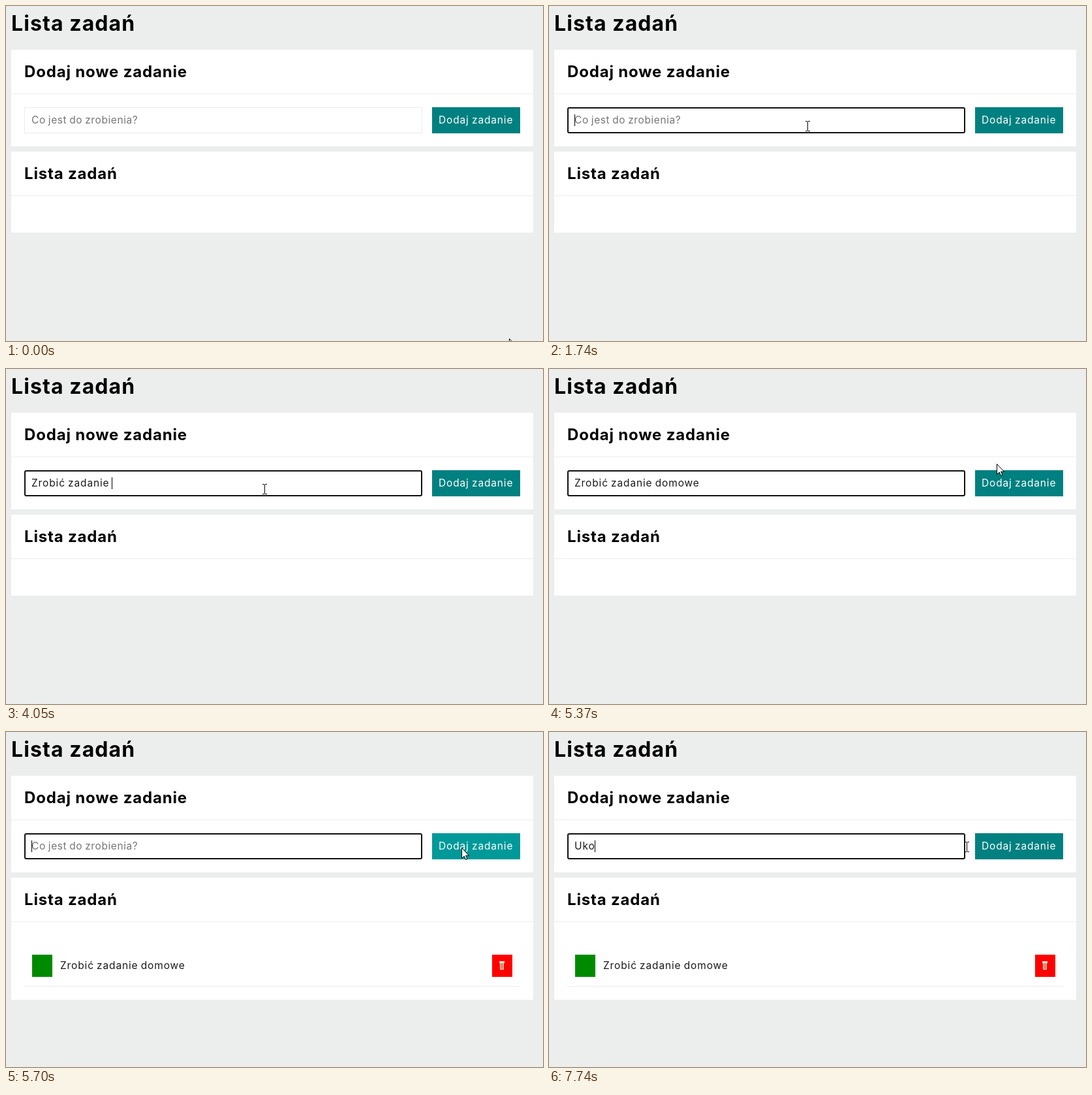
An HTML page that plays this animation: 823 px wide and 513 px high, repeating every 8000 ms.

```html
<!DOCTYPE html>
<html lang="pl">
<head>
<meta charset="utf-8">
<title>Lista zadań</title>
<style>
  html, body { margin: 0; width: 100%; height: 100%; overflow: hidden; background: #eceeee; }
  svg { display: block; width: 100vw; height: 100vh; }
  text {
    font: 400 15.5px Inter, sans-serif;
    letter-spacing: .055em; word-spacing: -.06em;
    white-space: pre; fill: #1a1a1a;
  }
  .h1, .h2 { font-weight: 700; letter-spacing: .034em; word-spacing: 0; fill: #000; }
  .h1 { font-size: 32px; }
  .h2 { font-size: 24px; }
  .hint { letter-spacing: .038em; fill: #757575; }
  .light { fill: #fff; }
  .line { fill: #eceeee; }
</style>
</head>
<body>
<svg viewBox="0 0 823 513" xmlns="http://www.w3.org/2000/svg">
  <rect width="823" height="513" fill="#eceeee"/>
  <text class="h1" x="8" y="38">Lista zadań</text>

  <rect x="8" y="67" width="800" height="148" fill="#fff"/>
  <rect x="8" y="134" width="800" height="1" class="line"/>
  <text class="h2" x="28" y="109">Dodaj nowe zadanie</text>
  <rect id="field" fill="#fff"/>
  <text id="hint" class="hint" x="39" y="180">Co jest do zrobienia?</text>
  <text id="typed" x="39" y="180"></text>
  <rect id="caret" y="166" width="1" height="18"/>
  <rect id="button" x="653" y="155" width="135" height="40"/>
  <text class="light" x="663" y="180">Dodaj zadanie</text>

  <rect id="card" x="8" y="223" width="800" fill="#fff"/>
  <rect x="8" y="290" width="800" height="1" class="line"/>
  <text class="h2" x="28" y="265">Lista zadań</text>
  <g id="task">
    <rect x="40" y="341" width="31" height="34" fill="#008a00"/>
    <text x="83" y="363">Zrobić zadanie domowe</text>
    <rect x="745" y="341" width="31" height="34" fill="#f00"/>
    <path d="M757.5 354V363.5H762.5V354M760 354V363" fill="#c8643c" stroke="#f6e3d3"/>
    <path d="M756 351h8v3h-8z" fill="#f6e3d3"/>
    <rect x="28" y="389" width="760" height="1" class="line"/>
  </g>

  <g id="pointer">
    <circle id="press" cx="-2" cy="-1" r="12" fill="#ff0" fill-opacity=".5"/>
    <path id="arrow" d="M.5 .5V16.5L4.2 13L6.7 18.5L9 17.5L6.6 12.2H11.5Z" fill="#fff" stroke="#000"/>
    <path id="beam" d="M-3 -7.5H0M1 -7.5H4M.5 -7V7M-3 7.5H0M1 7.5H4" fill="none" stroke="#000"/>
  </g>
</svg>
<script>
const LOOP = 8000, FRAME = 66.2, BLINK = 527, FOCUS = 664, ADDED = 5627;
const $ = id => document.getElementById(id);
const show = (id, on) => $(id).setAttribute('visibility', on ? 'visible' : 'hidden');
const set = (id, attrs) => {
  for (const k in attrs) $(id).setAttribute(k, attrs[k]);
};

// Bursts of evenly spaced key presses.
const bursts = [
  { text: 'Z', from: 1810, to: 1810 },
  { text: 'robi', from: 2210, to: 2660 },
  { text: 'ć za', from: 2920, to: 3510 },
  { text: 'danie ', from: 3580, to: 4050 },
  { text: 'domowe', from: 4180, to: 4640 },
  { text: 'Uko', from: 6880, to: 7735 }
];
const keys = bursts.flatMap(({ text, from, to }) =>
  [...text].map((char, i) => ({ char, time: from + (to - from) * i / Math.max(1, text.length - 1) })));

const smooth = u => u * u * (3 - 2 * u);
const easeOut = u => 1 - (1 - u) ** 3;
const entry = [771, 509], rest = [396, 184], target = [698, 177], edge = [640, 176];
const legs = [
  { from: 0, to: 600, a: entry, b: rest, ease: smooth, lift: 0 },
  { from: 5100, to: 5500, a: rest, b: target, ease: easeOut, lift: 36 },
  { from: 5700, to: 5990, a: target, b: edge, ease: smooth, lift: 0 }
];

function pointerAt(t) {
  const held = Math.floor(t / FRAME) * FRAME;
  const leg = legs.filter(l => l.from <= held).pop();
  const u = Math.min(1, (held - leg.from) / (leg.to - leg.from));
  const [x, y] = leg.a.map((v, i) => v + (leg.b[i] - v) * leg.ease(u));
  return [Math.round(x), Math.round(y - leg.lift * Math.sin(Math.PI * u))];
}

function drawField(t) {
  const focused = t >= FOCUS;
  set('field', focused
    ? { x: 29, y: 156, width: 608, height: 38, rx: 2, stroke: '#101010', 'stroke-width': 2 }
    : { x: 28.5, y: 155.5, width: 609, height: 39, rx: 0, stroke: '#e9ecec', 'stroke-width': 1 });

  const pressed = keys.filter(k => k.time <= t);
  const text = pressed.filter(k => t < ADDED || k.time > ADDED).map(k => k.char).join('');
  $('typed').textContent = text;
  show('hint', !text);

  const last = pressed.length ? pressed[pressed.length - 1].time : FOCUS;
  const width = text ? $('typed').getComputedTextLength() : 0;
  set('caret', { x: Math.floor(39 + width) });
  show('caret', focused && Math.floor((t - last) / BLINK) % 2 === 0);
}

function drawPointer(t) {
  const [x, y] = pointerAt(t);
  const inRow = y >= 155 && y < 195;
  const beam = inRow && x <= 640;
  set('pointer', { transform: `translate(${x} ${y})` });
  show('beam', beam);
  show('arrow', !beam);
  show('press', (t >= FOCUS && t < 798) || (t >= 5495 && t < ADDED));
  set('button', { fill: inRow && x >= 653 && x < 788 ? '#009999' : '#008080' });
}

function draw(t) {
  drawField(t);
  drawPointer(t);
  show('task', t >= ADDED);
  set('card', { height: t >= ADDED ? 187 : 124 });
}

const start = performance.now();
function tick() {
  draw((performance.now() - start) % LOOP);
  requestAnimationFrame(tick);
}
tick();
</script>
</body>
</html>
```
